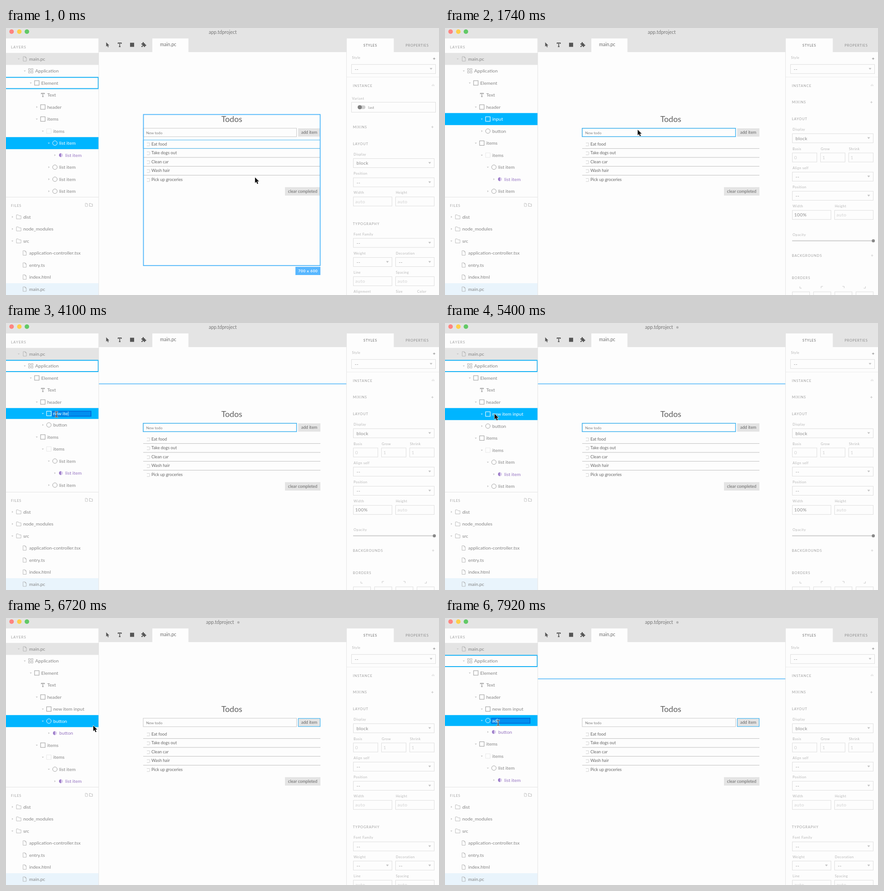
Write an HTML page that moves like this. It is 953x588 px and loops after 8000 ms.

```html
<!DOCTYPE html>
<html lang="en">
<head>
<meta charset="utf-8">
<title>app.tdproject</title>
<style>
html, body { margin: 0; width: 100%; height: 100%; overflow: hidden; background: #fdfdfd; }
svg { display: block; width: 100%; height: 100%; font-family: Lato, "Open Sans", sans-serif; }
text { white-space: pre; }
.tree { font-size: 10.4px; fill: #858585; }
.head { font-size: 7.5px; letter-spacing: .9px; fill: #a0a0a0; }
.tab { font-size: 7.5px; letter-spacing: .75px; fill: #666; }
.label { font-size: 7.5px; letter-spacing: .5px; fill: #b4b4b4; }
.value { font-size: 10.3px; letter-spacing: .4px; fill: #8c8c8c; }
.todo { font-size: 9.25px; fill: #666; }
.badge { font-size: 8.2px; font-weight: bold; letter-spacing: .7px; fill: #fff; }
</style>
</head>
<body>
<svg id="stage" viewBox="0 0 953 588" xmlns="http://www.w3.org/2000/svg"></svg>
<script>
const LOOP = 8000, ROW = 26.5;
const BLUE = '#00b5ff', SKY = '#4db5f9', GRAY = '#e4e4e4', EDGE = '#dedede';
const stage = document.getElementById('stage');
const pen = document.createElement('canvas').getContext('2d');

// Keyframes hold their value until the next one.
const pointer = [
  [0, 548, 329], [360, 478, 254], [530, 447, 237], [650, 436, 229], [770, 429, 225],
  [880, 426, 224], [990, 425, 223], [1350, 424, 224], [1950, 280, 211], [2120, 190, 206],
  [2240, 138, 203], [2360, 114, 201], [2470, 109, 200], [2940, 111, 201.5],
  [5400, 109, 200], [5900, 142, 214], [6010, 178, 231], [6130, 192, 237],
  [6980, 165, 232], [7100, 134, 228], [7220, 119, 226], [7340, 116, 226], [7570, 117, 231]
];
const hovers = [[0, 'Element'], [530, 'input'], [1620, ''], [2240, 'Application'], [5900, ''], [7220, 'Application']];
const typing = [
  [0, null], [2940, ''], [3510, 'n'], [3630, 'ne'], [3750, 'new'], [3860, 'new i'], [4100, 'new ite'],
  [4340, 'new item'], [4450, 'new item '], [4690, 'new item in'], [4930, 'new item inpu'],
  [5170, 'new item input'], [5400, null], [7570, ''], [7810, 'a'], [7920, 'ad']
];
const at = (keys, t) => keys.filter(k => k[0] <= t).pop();

const text = (x, y, s, cls, more = '') => `<text x="${x}" y="${y}" class="${cls}" ${more}>${s}</text>`;
const box = (x, y, w, h, fill, stroke = 'none', sw = 1) =>
  `<rect x="${x}" y="${y}" width="${w}" height="${h}" fill="${fill}" stroke="${stroke}" stroke-width="${sw}"/>`;
const path = (d, stroke, fill = 'none', sw = 1, more = '') =>
  `<path d="${d}" stroke="${stroke}" fill="${fill}" stroke-width="${sw}" ${more}/>`;
const dot = (x, y, r, fill, stroke = 'none') => `<circle cx="${x}" cy="${y}" r="${r}" fill="${fill}" stroke="${stroke}"/>`;
const plus = (x, y, c = '#aaa') => path(`M${x - 2.5} ${y}h5M${x} ${y - 2.5}v5`, c, 'none', .8);

const arrow = (x, y, open, c = '#c8c8c8') =>
  path(open ? `M${x - 2.2} ${y - 1}h4.4l-2.2 2.8z` : `M${x - 1} ${y - 2.2}v4.4l2.8 -2.2z`, 'none', c);
const page = (x, y, c = '#aaa', k = 1) =>
  path(`M${x - 3.5 * k} ${y - 5 * k}h${4.5 * k}l${2.5 * k} ${2.5 * k}v${7.5 * k}h${-7 * k}zM${x + k} ${y - 5 * k}v${2.5 * k}h${2.5 * k}`, c, 'none', .8);
const folder = (x, y, k = 1) =>
  path(`M${x - 5 * k} ${y + 4.5 * k}v${-9 * k}h${4 * k}l${1.5 * k} ${2 * k}h${4.5 * k}v${7 * k}z`, '#b5b5b5', 'none', .9);

const icons = {
  page,
  parts: (x, y, c) => [[-5, -5], [1, -5], [-5, 1], [1, 1]].map(([a, b]) => box(x + a, y + b, 3.6, 3.6, 'none', c, .8)).join(''),
  box: (x, y, c) => box(x - 5, y - 5, 10, 10, 'none', c, 1.1),
  ghost: (x, y) => `<g stroke-dasharray="1 1">${box(x - 5, y - 5, 10, 10, 'none', '#ccc', .8)}</g>`,
  ring: (x, y, c) => dot(x, y, 5, 'none', c),
  half: (x, y) => dot(x, y, 4.2, '#d9cbec') + path(`M${x} ${y - 4.2}a4.2 4.2 0 0 0 0 8.4z`, 'none', '#9a78c8'),
  type: (x, y, c) => path(`M${x - 3.4} ${y - 1.8}v-2h6.8v2M${x} ${y - 3.8}v7.6M${x - 1.6} ${y + 3.8}h3.2`, c, 'none', 1.4)
};

// Rows: depth, icon, name, expander (1 open, 0 closed, -1 none)
const top4 = [[0, 'page', 'main.pc', 1], [1, 'parts', 'Application', 1], [2, 'box', 'Element', 1], [3, 'type', 'Text', -1]];
const lists = [[3, 'box', 'items', 1], [4, 'ghost', 'items', 1], [5, 'ring', 'list item', 1], [6, 'half', 'list item', 0]];
const closed = [5, 'ring', 'list item', 0];

function layers(step, inputName) {
  if (step === 0) return [...top4, [3, 'box', 'header', 0], ...lists, closed, closed, closed];
  const head = [...top4, [3, 'box', 'header', 1], [4, 'box', inputName, 1]];
  if (step === 1) return [...head, [4, 'ring', 'button', 0], ...lists, closed];
  return [...head, [4, 'ring', 'button', 1], [5, 'half', 'button', 0], ...lists];
}

function editor(y, typed, old) {
  pen.font = '10px Lato, "Open Sans", sans-serif';
  const w = pen.measureText(typed).width;
  return box(102.5, y - 5, 84.5, 11, '#008ff0', '#0070dc', 2) +
    (typed ? '' : box(103.5, y - 4, pen.measureText(old).width, 9, '#0062c8')) +
    text(103.5, y + 4, typed || old, '', 'font-size="10" fill="#fff"') +
    (typed ? box(104 + w, y - 4.5, .8, 10, '#fff') : '');
}

function tree(step, inputName, hover, typed) {
  const picked = [7, 5, 6][step], editing = typed !== null;
  let out = box(0, 54.8, 204, ROW, GRAY);
  layers(step, inputName).forEach(([d, icon, name, open], i) => {
    const on = i === picked, edit = on && editing;
    const y = 68 + ROW * i - (editing && i > picked ? 2.5 : edit ? 1.2 : 0);
    const x = 13.25 * d, c = on ? '#fff' : '#a0a0a0';
    if (on) out += box(0, 54.8 + ROW * i, 204, edit ? 24 : ROW, BLUE);
    if (name === hover) out += box(-1, y - 12.3, 204, 24.8, 'none', '#16b1f5', 2);
    if (open >= 0) out += arrow(28 + x, y, open, on ? '#9fe0ff' : undefined);
    out += icons[icon](41.4 + x, y, icon === 'page' ? '#aaa' : c);
    out += edit ? editor(y, typed, step === 1 ? 'input' : 'button')
      : text(51 + x, y + 3.7, name, 'tree', on ? 'style="fill:#fff"' : icon === 'half' ? 'style="fill:#9674c2"' : '');
  });
  return out;
}

function files() {
  let out = box(0, 372, 204, 216, '#fdfdfd') + box(0, 372, 204, 1, GRAY) + text(11, 393.6, 'FILES', 'head') +
    page(177, 389.5, '#bbb', .7) + folder(187, 389.5, .7) + box(0, 562, 204, 26, '#e9f4fc');
  ['dist', 'node_modules', 'src', 'application-controller.tsx', 'entry.ts', 'index.html', 'main.pc'].forEach((name, i) => {
    const y = 416 + ROW * i, dir = i < 3;
    out += dir ? arrow(14, y, i === 2) + folder(28, y) : page(41, y);
    out += text(dir ? 38 : 51, y + 3.7, name, 'tree');
  });
  return out;
}

function frame(saved) {
  const puzzle = 'M298 34h2.7a1.7 1.7 0 1 1 2.6 0h2.7v2.8a1.6 1.6 0 1 1 0 2.5v2.5h-2.6a1.5 1.5 0 1 0 -2.6 0h-2.8v-2.6a1.6 1.6 0 1 0 0 -2.6z';
  return box(0, 0, 953, 23, GRAY) + dot(12.3, 8, 5, '#ff8581') + dot(29.3, 8, 5, '#ffd04a') + dot(46, 8, 5, '#62c966') +
    text(saved ? 471 : 477, 12.9, 'app.tdproject', 'tree', 'text-anchor="middle" style="font-size:10.55px;fill:#777"') +
    (saved ? dot(511.5, 9.7, 2.6, '#b5b5b5') : '') +
    box(204, 23, 546, 30, GRAY) + box(322, 23, 79.5, 30.5, '#fdfdfd') +
    text(339, 40.3, 'main.pc', 'tree', 'style="font-size:10.6px;fill:#707070"') +
    path('M220.5 31.5v9.5l2.3 -1.9l1.5 3.4l1.6 -.7l-1.5 -3.4h3z', 'none', '#555') +
    path('M246.8 35v-2.2h7v2.2M250.3 32.8v8.4M248.5 41.2h3.6', '#555', 'none', 1.7) +
    box(273, 32.5, 9, 9, '#555') + path(puzzle, 'none', '#555') +
    text(11, 44.6, 'LAYERS', 'head', 'style="font-size:7.8px;letter-spacing:1.1px"') +
    box(203.5, 23, 1, 565, GRAY);
}

function todos(step, hover) {
  let out = text(497, 207.3, 'Todos', '', 'font-size="17.8" fill="#606060" text-anchor="middle"') +
    box(302, 220.8, 337.5, 18.5, '#fdfdfd', '#c8c8c8') +
    text(308.5, 233.8, 'New todo', 'todo', 'style="font-size:8.25px;fill:#808080"') +
    box(643, 221, 49, 18.3, GRAY) + text(667.5, 233.2, 'add item', 'todo', 'text-anchor="middle"') +
    box(614, 350.5, 78, 18.5, GRAY) + text(653, 363, 'clear completed', 'todo', 'text-anchor="middle"');
  ['Eat food', 'Take dogs out', 'Clean car', 'Wash hair', 'Pick up groceries'].forEach((s, i) => {
    const y = 255.6 + 19.6 * i;
    out += path(`M310 ${y - 2.5}h5.5q1 0 1 1v4.5q0 1 -1 1h-5.5`, '#c4c4c4', 'none', .8) + text(320, y + 3, s, 'todo');
    if (i < 4) out += box(302, y + 9.3, 390, 1, '#bebebe');
  });
  out += [box(302, 246.7, 389.5, 18.6, 'none', '#40b4f2'), box(302, 220.8, 337.5, 18.5, 'none', '#40b4f2', 1.5),
    box(643.3, 221.2, 48.2, 17.8, 'none', '#40b4f2', 1.2)][step];
  const badge = (x, y, w, s) => box(x, y, w, 18, '#58b7ff') + text(x + w / 2 + .3, y + 12, s, 'badge', 'text-anchor="middle"');
  if (hover === 'Element') out += box(302.5, 190.5, 389, 332.7, 'none', SKY, 1.8) + badge(637, 526, 55, '700 x 600');
  if (hover === 'input') out += box(302.3, 221.3, 337, 17.8, 'none', SKY, 2) + badge(591, 241.3, 49, '607 x 34');
  if (hover === 'Application') out += box(204.5, 133.3, 545, 1.5, SKY);
  return out;
}

function panel(step) {
  const head = (y, s) => text(763.5, y + 2.8, s, 'head');
  const label = (x, y, s) => text(x, y + 2.6, s, 'label');
  const field = (x, y, w, val, faint = true) => box(x + .5, y + .5, w - 1, 20, '#fdfdfd', EDGE) +
    text(x + 4.5, y + 14.3, val, 'value', faint ? 'style="fill:#d2d2d2"' : '');
  const select = (x, y, w, val = '--') => box(x + .5, y + .5, w - 1, 20, '#fdfdfd', EDGE) +
    text(x + 7.5, y + 14.2, val, 'value') + path(`M${x + w - 13.5} ${y + 8.3}h6l-3 4z`, 'none', '#c4c4c4');
  const pair = (y, a, b, draw) => label(765, y, a) + label(858, y, b) + draw(764, y + 8.8, 86) + draw(857, y + 8.8, 86);
  const auto = (x, y, w) => field(x, y, w, 'auto');

  let out = box(750, 23, 203, 565, '#fdfdfd') + box(749, 23, 1, 565, GRAY) + box(853.5, 23, 100, 30, GRAY) +
    text(801.8, 40.6, 'STYLES', 'tab', 'text-anchor="middle"') +
    text(905, 40.6, 'PROPERTIES', 'tab', 'text-anchor="middle" style="fill:#8a8a8a"') +
    label(761.5, 65, 'Style') + plus(942.3, 67.5, '#777') + select(760, 79.8, 186) + box(750, 107.5, 203, 1, '#ebebeb') +
    head(127, 'INSTANCE') + path('M937.5 128v-2l2.5 -2.5l2.5 2.5v2M939 128v-2h2v2', '#d4d4d4', 'none', .7);
  if (step === 0) {
    out += label(761.5, 155, 'Variant') + box(760.5, 163.5, 185, 22, '#fdfdfd', EDGE) +
      `<rect x="774" y="170.5" width="17" height="8" rx="4" fill="#cfcfcf"/>` + dot(778.6, 174.5, 4.6, '#808080') +
      text(797, 177.6, 'last', 'value', 'style="font-size:8.3px;letter-spacing:.2px"');
  }
  const mix = step ? 163.5 : 218;
  let y = step ? 200.3 : 255;
  out += head(mix, 'MIXINS') + plus(938.5, mix, '#bbb') + head(y, 'LAYOUT') +
    label(765, y + 23.3, 'Display') + select(764, y + 32, 179, 'block');
  if (step) {
    ['Basis', 'Grow', 'Shrink'].forEach((s, i) => {
      out += label(765 + 62 * i, 266, s) + field(764 + 62 * i, 274.6, 55, i ? '1' : '0');
    });
    out += label(765, 308.3, 'Align self') + select(764, 316.8, 179);
    y += 84.3;
  }
  out += label(765, y + 65.8, 'Position') + select(764, y + 74.4, 179) +
    pair(y + 107.7, 'Width', 'Height', (x, yy, w) => step === 1 && x < 800 ? field(x, yy, w, '100%', false) : auto(x, yy, w));
  if (step === 1) {
    out += label(765, 455.5, 'Opacity') + box(764, 467.5, 179, 2.2, '#d2d2d2') + dot(942.7, 468.7, 3.4, '#888') +
      head(501, 'BACKGROUNDS') + plus(940, 501, '#c8c8c8') + head(549.7, 'BORDERS');
    ['M0 -2v4h4', 'M0 2v-4h4', 'M0 -2h4v4', 'M0 2h4v-4'].forEach((d, i) => {
      out += `<g transform="translate(${781 + 46.8 * i} 571)">${path(d, '#bbb', 'none', .8)}</g>` +
        field(764 + 46.7 * i, 580.5, 39, '--');
    });
    return out;
  }
  y = step ? 460.5 : 430.7;
  return out + head(y, 'TYPOGRAPHY') + label(765, y + 23.2, 'Font Family') + select(764, y + 32, 179) +
    pair(y + 65.4, 'Weight', 'Decoration', select) + pair(y + 107.6, 'Line', 'Spacing', auto) +
    label(765, y + 149.6, 'Alignment') + label(858, y + 149.6, 'Size') + label(905, y + 149.6, 'Color');
}

function cursor(x, y, beam) {
  const d = beam ? 'M-3.5 -6q3 0 3.5 1.8q.5 -1.8 3.5 -1.8M0 -4.5v9M-3.5 6q3 0 3.5 -1.8q.5 1.8 3.5 1.8M-1.8 2h3.6'
    : 'M0 0v12.2l2.8 -2.6l2.1 4.9l2.2 -1l-2.1 -4.8h3.9z';
  return `<g transform="translate(${x} ${y})">` + (beam
    ? path(d, '#fff', 'none', 2.6) + path(d, '#222', 'none', 1.2)
    : path(d, '#fff', '#111', 1.4, 'paint-order="stroke" stroke-linejoin="round"')) + '</g>';
}

let shown = '';
function update(t) {
  const step = t < 1620 ? 0 : t < 6490 ? 1 : 2;
  const saved = t >= 5400;
  const hover = at(hovers, t)[1], typed = at(typing, t)[1];
  const [, x, y] = at(pointer, t);
  const key = [step, saved, hover, typed, x, y].join();
  if (key === shown) return;
  shown = key;
  stage.innerHTML = box(0, 0, 953, 588, '#fdfdfd') + tree(step, saved ? 'new item input' : 'input', hover, typed) +
    files() + frame(saved) + todos(step, hover) + panel(step) + cursor(x, y, typed !== null);
}

const start = performance.now();
function tick() {
  update((performance.now() - start) % LOOP);
  requestAnimationFrame(tick);
}
tick();
</script>
</body>
</html>
```
